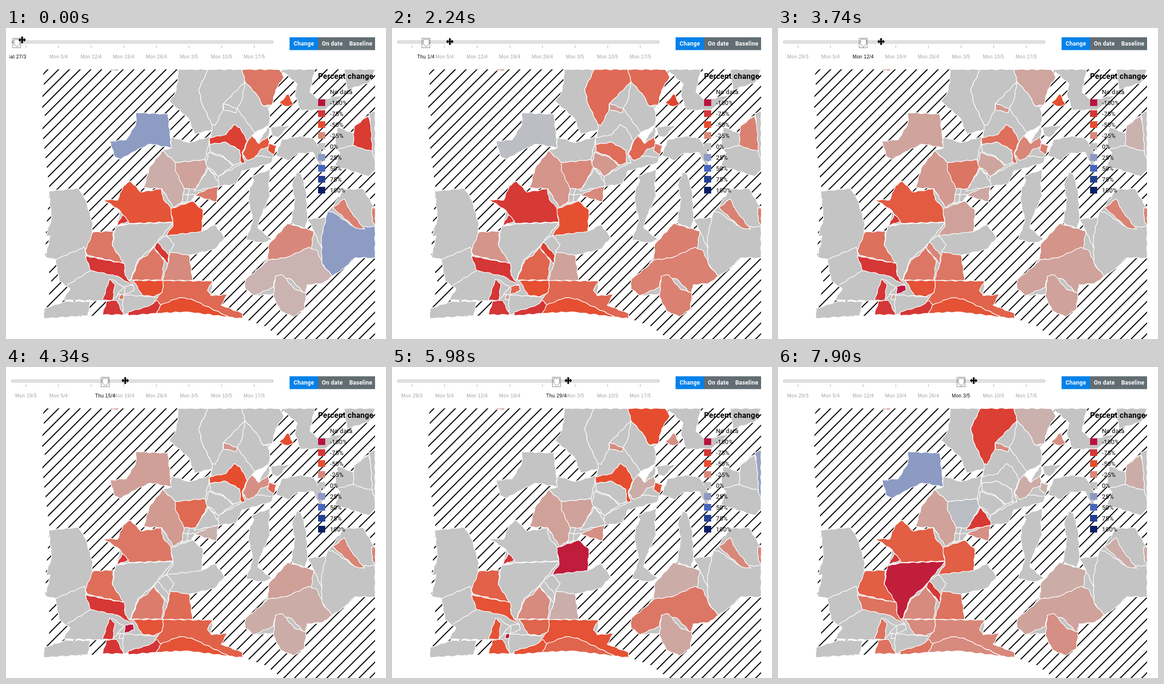
Animation of 800x654 px, one loop 8000 ms. Source, as an HTML page:

```html
<!DOCTYPE html>
<html lang="en">
<head>
<meta charset="utf-8">
<title>Percent change map</title>
<style>
  html, body { margin: 0; height: 100%; overflow: hidden; background: #fff; }
  svg { display: block; font-family: Roboto, sans-serif; letter-spacing: .3px; }
  .mid { text-anchor: middle; }
  .axis { font: 10px "Liberation Sans", sans-serif; letter-spacing: .4px; }
  .button { font-size: 12px; font-weight: 700; fill: #fff; }
  .legend { font-size: 13px; }
  #map { fill: #c4c4c4; stroke: #fff; stroke-width: 1.4; stroke-linejoin: round; }
</style>
</head>
<body>
<svg width="800" height="654" viewBox="0 0 800 654">
  <defs>
    <pattern id="hatch" width="16" height="16" patternUnits="userSpaceOnUse" patternTransform="translate(17 0) rotate(45)">
      <path d="M0 0V16M16 0V16" stroke="#000" stroke-width="2.2"/>
    </pattern>
    <clipPath id="mapClip"><path d="M0 87H777V654H0z"/></clipPath>
    <clipPath id="sliderClip"><path d="M7 0H800V80H7z"/></clipPath>
  </defs>
  <g clip-path="url(#mapClip)">
    <path fill="url(#hatch)" d="M84 87L78 97 80 125 74 160 82 185 76 215 92 342 84 430 83 482 104 488 88 503 96 535 80 611 202 604 380 598 498 610 545 627 582 654H777V87z"/>
    <g id="map"></g>
  </g>
  <g id="legend"></g>
  <g id="buttons"></g>
  <g clip-path="url(#sliderClip)">
    <path d="M14 29.5H560" stroke="#bbb" stroke-width="6" stroke-linecap="round"/>
    <path d="M14 29.5H560" stroke="#e6e6e6" stroke-width="4" stroke-linecap="round"/>
    <g id="ticks"></g>
    <g id="handle">
      <path d="M-5.5 24v10l6 5.5 6-5.5v-10z" fill="#fff" stroke="#777"/>
      <rect x="-8.5" y="21.5" width="17" height="20" fill="none" stroke="#000" stroke-dasharray="1 1"/>
      <text id="date" class="axis mid" y="64"></text>
    </g>
  </g>
  <path id="cursor" d="M-8 0L-3.5 -4.5V-1.2H-1.8V-7H1.8V-1.2H3.5V-4.5L8 0 3.5 4.5V1.2H1.8V7H-1.8V1.2H-3.5V4.5z" stroke="#fff" paint-order="stroke"/>
</svg>
<script>
const $ = id => document.getElementById(id);

function add(parent, tag, attrs, text = '') {
  const node = document.createElementNS('http://www.w3.org/2000/svg', tag);
  for (const name in attrs) node.setAttribute(name, attrs[name]);
  node.textContent = text;
  return parent.appendChild(node);
}

// Colours for -100% to 100% in steps of 25
const scale = [[184, 18, 62], [213, 54, 54], [230, 77, 47], [216, 136, 123], [196, 196, 196],
  [140, 154, 196], [72, 102, 192], [35, 64, 146], [10, 31, 100]];
function colour(percent) {
  const pos = (percent + 100) / 25, i = Math.min(7, Math.floor(pos));
  return `rgb(${scale[i].map((c, k) => Math.round(c + (scale[i + 1][k] - c) * (pos - i)))})`;
}

// Linear interpolation through keys such as { 0: -50, 9: 20 }, held at both ends
function track(keys, x) {
  const xs = Object.keys(keys).map(Number);
  const right = xs.find(k => k >= x) ?? xs[xs.length - 1];
  const left = xs.filter(k => k <= x).pop() ?? right;
  const share = right > left ? (x - left) / (right - left) : 0;
  return keys[left] + (keys[right] - keys[left]) * share;
}

// A wavy border that comes out the same from either end, so neighbours fit
function border(a, b) {
  if (a[0] > b[0] || (a[0] === b[0] && a[1] > b[1])) return border(b, a).reverse();
  const dx = b[0] - a[0], dy = b[1] - a[1], length = Math.hypot(dx, dy);
  const count = Math.ceil(length / 6);
  return Array.from({ length: count + 1 }, (_, i) => {
    const t = i / count;
    const bend = Math.sin(Math.PI * t) * Math.sin(t * length * .3 + a[0] + a[1]) * 1.2 / length;
    return [a[0] + dx * t - dy * bend, a[1] + dy * t + dx * bend];
  });
}

function drawBorders(tag, outline, attrs) {
  const corners = outline.split(' ').map(pair => pair.split(',').map(Number));
  if (tag === 'polygon') corners.push(corners[0]);
  const points = corners.slice(1).flatMap((corner, i) => border(corners[i], corner));
  return add($('map'), tag, { points: points.map(p => p.map(v => v.toFixed(1))).join(' '), ...attrs });
}

// Land with data, from the north-west to the south-east
[
  '362,87 577,87 585,103 568,130 560,162 552,165 556,190 553,240 571,248 564,266 558,284 508,298 497,300 485,328 447,333 443,366 398,352 388,368 370,366 353,378 328,338 290,336 302,293 330,258 347,252 348,229 385,241 430,228 432,215 397,223 384,190 344,155 357,134 362,110',
  '262,322 284,345 327,338 352,372 393,364 415,383 412,428 440,413 461,441 440,465 386,478 393,531 435,532 432,563 466,560 453,583 498,600 498,611 380,598 202,604 212,574 120,572 135,548 112,532 104,487 83,482 93,437 84,437 96,400 90,343 153,337 168,362 183,413 181,430 226,427 255,412 233,416 240,385 204,361 235,362 247,332',
  '80,590 125,575 178,575 172,605 80,611',
  '578,87 613,118 608,140 620,173 672,172 700,150 712,140 660,152 640,135 650,87',
  '712,87 777,87 765,115 718,130',
  '558,208 597,205 573,230 560,225',
  '568,268 580,235 620,227 648,233 665,262 665,303 647,262 612,264 596,279',
  '698,208 733,222 733,205 777,175 777,300 763,312 693,290 703,262 692,250',
  '557,297 553,330 556,352 535,400 530,420 560,445 540,452 505,445 520,405 511,365 512,340 522,320 516,312',
  '612,303 622,308 632,345 635,402 630,422 600,410 608,362 602,330',
  '688,375 712,339 752,338 777,380 777,484 735,483 712,505 687,522 667,537 634,542 628,592 605,607 578,595 563,560 522,563 503,548 504,528 540,500 555,470 553,455 593,411 648,427 635,402 674,398 677,385'
].forEach(outline => drawBorders('polygon', outline));

// Borders inside the land
[
  '426,87 406,128 412,158 434,204 432,230',
  '330,258 357,283 419,277 430,228',
  '420,292 447,312 497,285 500,266 558,272',
  '447,312 447,333',
  '320,447 338,437 354,455 343,472',
  '83,482 104,487 165,461 178,510 128,541',
  '386,338 380,367',
  '370,350 398,350',
  '222,528 248,545 227,570',
  '234,560 316,566',
  '246,560 246,603',
  '648,427 664,462',
  '697,255 731,247'
].forEach(outline => drawBorders('polyline', outline, { fill: 'none' }));

drawBorders('polygon', '553,207 532,214 519,226 532,243 540,225', { fill: '#fff' });

// Percent change by day, and the regions that follow it
const areas = [
  [{ 0: 0, 2: -65, 9: 0, 33: 0, 37: -65 }, '426,87 406,128 412,158 434,204 440,205 457,172 457,160 503,113 497,87'],
  [{ 0: -32, 9: -42, 19: 0, 23: -42, 33: -50, 37: -8 }, '497,87 575,87 585,103 568,130 560,162 541,164 528,140 503,113'],
  [{ 19: 0, 23: -15, 33: 0 }, '503,113 528,140 541,164 552,165 556,190 553,205 524,220 487,170 497,150'],
  [{ 0: 0, 2: -15, 37: -24 }, '458,159 488,170 485,178 457,172'],
  [{ 0: -65, 2: 0, 9: 0, 19: -50, 33: -50, 37: 0 }, '429,231 463,224 480,203 493,210 508,238 497,262 503,284 497,285 488,272 492,257 462,240 429,245'],
  [{ 0: 0, 2: -63, 9: 0 }, '429,245 462,240 492,257 494,283 478,288 458,270 429,260'],
  [{ 2: 0, 9: -43, 19: 0 }, '426,262 458,272 478,290 447,312 434,298 420,292'],
  [{ 0: -45, 19: -22, 23: -42, 33: -10 }, '517,226 532,243 552,228 555,250 538,254 522,274 508,278 498,266 506,244'],
  [{ 0: -50, 2: -48, 9: -10, 19: -38, 33: -48, 37: -8 }, '553,243 570,247 564,266 551,258'],
  [{ 0: -48, 2: -70, 9: -48, 23: -50, 33: -22 }, '594,138 606,162 590,165 575,158'],
  [{ 0: -68, 2: -30, 9: -25, 19: 0, 33: 0, 37: -10 }, '762,185 775,212 774,260 745,252 731,247 733,207'],
  [{ 23: 0, 33: 20, 37: 0 }, '764,180 777,175 777,273 772,265 768,205'],
  [{ 0: 24, 2: 0 }, '677,385 688,387 735,420 777,417 777,484 735,483 712,505 687,522 665,495 664,440'],
  [{ 0: -28, 33: -25, 37: -10 }, '712,359 725,385 755,423 735,420 688,378', '770,378 778,380 778,418 771,405'],
  [{ 0: -25, 9: -32, 19: -15, 23: -24, 33: -10 }, '593,411 648,427 643,462 590,483 551,488 553,455'],
  [{ 0: -7, 2: -32, 19: -10, 23: 0, 33: -32, 37: -14 }, '551,488 590,483 638,461 655,468 668,500 687,522 667,537 634,540 630,560 600,528 567,522 563,545 522,563 503,548 504,528 540,500'],
  [{ 0: -7, 2: -32, 19: -10, 23: -40, 33: -12, 37: -22 }, '567,522 582,519 608,550 632,557 628,592 605,607 578,595 563,565'],
  [{ 0: 24, 2: 14, 9: -10, 19: -15, 33: 0, 37: 25 }, '274,178 341,181 346,230 348,252 303,244 267,261 240,277 228,270 219,238 253,235 273,203'],
  [{ 0: -9, 2: -20, 37: -14 }, '330,258 357,283 365,312 375,338 371,365 353,378 328,338 290,336 302,293', '213,86 242,86 235,90 222,90'],
  [{ 0: -14, 2: -28, 9: -20, 19: -38, 23: -22, 33: -14, 37: 4 }, '357,283 419,277 424,293 409,322 400,338 375,338 356,298'],
  [{ 0: -30, 19: -8, 23: -17, 33: -22 }, '447,332 443,366 397,352 425,338'],
  [{ 33: 0, 37: -72 }, '427,295 448,325 447,333 396,343 409,322'],
  [{ 0: -47, 2: -72, 9: -72, 19: -32, 23: 4, 33: 0, 37: -43 }, '262,322 284,345 327,338 331,360 347,378 351,408 260,411 238,382 204,361 235,362 247,332'],
  [{ 0: -75 }, '245,392 258,406 233,416'],
  [{ 0: -50, 9: -48, 19: 0, 23: -46, 33: -93, 37: -43 }, '393,364 415,383 412,428 337,437 352,415 347,380'],
  [{ 33: 0, 37: -92 }, '257,412 352,409 308,462 278,487 262,530 252,528 247,495 224,458 230,419'],
  [{ 0: -73, 2: -47, 9: -88, 19: 0, 23: -73, 33: 0, 37: -72 }, '319,450 343,478 341,496 312,463'],
  [{ 0: -32, 2: -42, 19: -30, 23: -44, 33: -24 }, '310,461 333,489 328,530 263,530 280,488 298,478'],
  [{ 0: -24, 2: -9, 19: -37, 23: -36, 33: -9, 37: -34 }, '346,471 386,478 393,531 329,531 341,495'],
  [{ 0: -32, 2: -10, 9: -32, 37: -43 }, '183,429 226,427 224,458 248,495 172,478 167,468'],
  [{ 2: 0, 9: -96, 23: -96, 33: 0 }, '250,543 268,541 270,552 249,560'],
  [{ 0: -35, 2: 0, 9: -32, 19: 0, 23: 0, 33: -95, 37: 0 }, '240,562 247,561 246,571 238,571'],
  [{ 0: -38, 23: -42, 33: -48, 37: -25 }, '331,531 435,532 424,552 432,563 466,560 453,583 498,600 498,611 470,608 390,570 326,582 313,573 329,555'],
  [{ 0: -50, 23: -47, 33: -40, 37: -24 }, '268,531 331,531 329,555 312,565 287,562', '316,600 326,582 365,567 390,570 470,608 380,597'],
  [{ 0: -75, 23: -74, 33: -48, 37: -34 }, '167,479 205,487 249,495 251,520 267,541 235,522 178,510', '218,528 229,538 225,572 203,573', '212,574 233,573 248,603 203,603', '258,597 300,585 318,573 326,582 316,600 258,605']
].map(([trend, ...outlines]) => ({ trend, nodes: outlines.map(outline => drawBorders('polygon', outline)) }));

add($('legend'), 'text', { x: 657, y: 107, 'font-size': 16, 'font-weight': 700 }, 'Percent change');
add($('legend'), 'text', { x: 682, y: 139, class: 'legend' }, 'No data');
for (let i = 0; i < 9; i++) {
  const percent = i * 25 - 100, y = 157 + i * 23;
  add($('legend'), 'rect', { x: 657, y: y - 7, width: 15, height: 14, fill: colour(percent) });
  add($('legend'), 'text', { x: 682, y: y + 5, class: 'legend' }, percent + '%');
}

['Change', 'On date', 'Baseline'].forEach((label, i) => {
  const x = 597 + i * 60;
  add($('buttons'), 'rect', { x, y: 19.5, width: 60, height: 27, fill: i ? '#626d73' : '#0481e8' });
  add($('buttons'), 'text', { x: x + 30, y: 37.2, class: 'button mid' }, label);
});

const dayX = day => 22.4 + day * 9.81;
const weekdays = ['Sun', 'Mon', 'Tue', 'Wed', 'Thu', 'Fri', 'Sat'];
function dateLabel(day) {
  const d = new Date(Date.UTC(2021, 2, 27 + day));
  return `${weekdays[d.getUTCDay()]} ${d.getUTCDate()}/${d.getUTCMonth() + 1}`;
}
const ticks = Array.from({ length: 8 }, (_, week) => {
  const day = 2 + week * 7, x = dayX(day);
  add($('ticks'), 'path', { d: `M${x} 36.5v5.5`, stroke: '#aaa' });
  return { day, label: add($('ticks'), 'text', { x, y: 64, class: 'axis mid', fill: '#a0a0a0' }, dateLabel(day)) };
});

// The drag, keyed by steps of 150 ms
const dayAt = { 4: 0, 11: 2, 18: 8, 21: 9, 25: 16, 29: 19, 35: 23, 40: 33, 44: 35, 47: 35, 52: 37 };
const cursorAt = { 4: 34, 11: 81, 21: 183, 29: 251, 35: 320, 40: 371, 44: 386, 47: 386, 52: 412 };

function draw(now) {
  const step = Math.floor((now % 8000 + 20) / 150);
  const day = Math.round(track(dayAt, step));
  for (const { trend, nodes } of areas) {
    const fill = colour(track(trend, day));
    nodes.forEach(node => node.setAttribute('fill', fill));
  }
  for (const tick of ticks) tick.label.setAttribute('visibility', Math.abs(tick.day - day) <= 3 ? 'hidden' : 'visible');
  $('handle').setAttribute('transform', `translate(${dayX(day)} 0)`);
  $('date').textContent = dateLabel(day);
  $('cursor').setAttribute('transform', `translate(${track(cursorAt, step)} ${step < 2 ? 25 : 28.5})`);
}

const start = performance.now();
function loop() {
  draw(performance.now() - start);
  requestAnimationFrame(loop);
}
loop();
</script>
</body>
</html>
```
